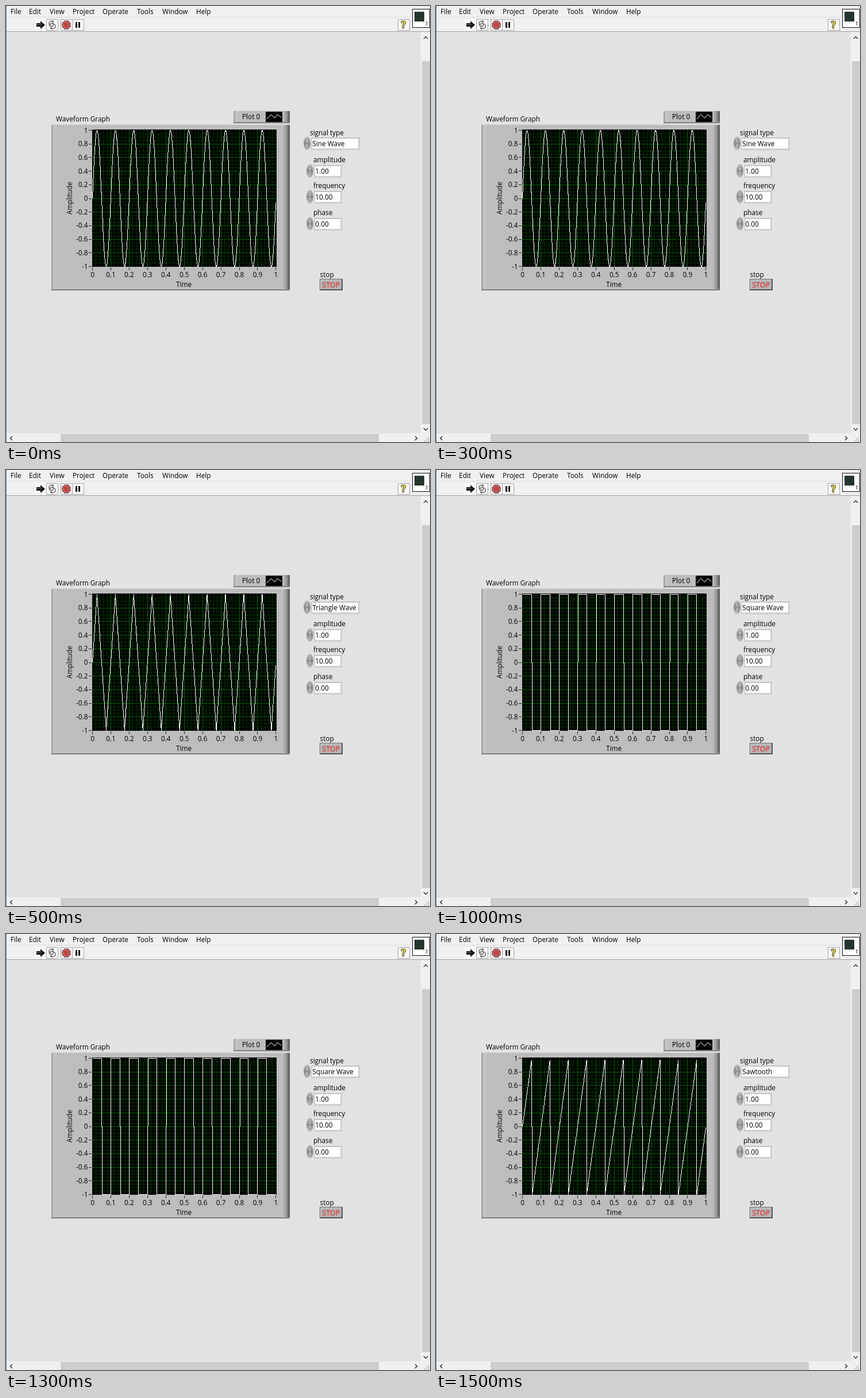
These frames come from a looping animation (738 by 759 pixels, 2 s). An HTML page:

```html
<!DOCTYPE html>
<html lang="en">
<head>
<meta charset="utf-8">
<title>Waveform generator panel</title>
<style>
  html, body { margin: 0; width: 100%; height: 100%; overflow: hidden; background: #e2e2e2; }
  svg { display: block; width: 738px; height: 759px; }
  text { font: 11.8px "Open Sans", "Noto Sans", sans-serif; fill: #000; }
  .crisp { shape-rendering: crispEdges; }
</style>
</head>
<body>
<svg id="stage" viewBox="0 0 738 759">
  <defs>
    <linearGradient id="rim">
      <stop offset="0" stop-color="#9a9a9a"/><stop offset=".4" stop-color="#c6c6c6"/><stop offset="1" stop-color="#bdbdbd"/>
    </linearGradient>
    <linearGradient id="shade">
      <stop offset="0" stop-color="#bdbdbd"/><stop offset=".5" stop-color="#999"/><stop offset="1" stop-color="#505050"/>
    </linearGradient>
    <linearGradient id="knob">
      <stop offset="0" stop-color="#858585"/><stop offset=".4" stop-color="#c4c4c4"/><stop offset="1" stop-color="#8c8c8c"/>
    </linearGradient>
    <clipPath id="plot"><rect x="150" y="215" width="321" height="239"/></clipPath>
  </defs>
</svg>
<script>
const stage = document.getElementById('stage');

function add(tag, attrs, content = '') {
  const node = document.createElementNS('http://www.w3.org/2000/svg', tag);
  for (const key in attrs) node.setAttribute(key, attrs[key]);
  node.textContent = content;
  return stage.appendChild(node);
}
const rect = (x, y, width, height, fill, more = {}) =>
  add('rect', { x, y, width, height, fill, class: 'crisp', ...more });
const box = (x, y, w, h, fill, stroke) =>
  rect(x + .5, y + .5, w - 1, h - 1, fill, { stroke });
const path = (d, stroke, more = {}) => add('path', { d, stroke, fill: 'none', ...more });
const fillPath = (d, fill, more = {}) => add('path', { d, fill, ...more });
const label = (str, x, y, more = {}) => add('text', { x, y, ...more }, str);

// Window chrome
rect(0, 0, 738, 44, '#f0f0f0');
rect(0, 19, 706, 1, '#dcdcdc');
rect(0, 44, 738, 1, '#a0a0a0');
const menu = { File: 8, Edit: 40, View: 76, Project: 116, Operate: 168, Tools: 228, Window: 272, Help: 331 };
for (const name in menu) label(name, menu[name], 13.5);

// Toolbar
rect(50, 23, 86, 20, '#f7f7f7');
for (const x of [70, 95, 115]) box(x, 23, 21, 20, '#f7f7f7', '#a6a6a6');
fillPath('M53 30H60V26L68 33L60 40V36H53Z', '#111');
path('M54 32.5H62', '#777');
path('M75 33V29Q75 27 78 27H82M80 25L83 27.5L80 30M86 32V36Q86 39 83 39H78M80 36L77 38.5L80 41M77 31H84L82 35H76Z', '#222');
const octagon = 'M102 26H108L112 30V36L108 40H102L98 36V30Z';
fillPath(octagon, '#c04848', { stroke: '#4a1c1c' });
path(octagon, '#e0a0a0', { transform: 'translate(21 6.6) scale(.8)' });
rect(121, 28, 3, 10, '#111');
rect(126, 28, 3, 10, '#111');
box(682, 23, 21, 20, '#f7f7f7', '#a6a6a6');
label('?', 687.5, 39, { style: 'font-size:17px;font-weight:800;fill:#f3e624;stroke:#333;stroke-width:.8px' });
box(707, 5, 31, 33, '#fff', '#111');
rect(711, 10, 17, 17, '#25352c');
label('1', 730, 34, { style: 'font-size:8.5px' });

// Scroll bars
rect(722, 45, 16, 699, '#f0f0f0');
rect(0, 744, 738, 15, '#f0f0f0');
rect(724, 96, 14, 632, '#cdcdcd');
rect(95, 745, 554, 14, '#cdcdcd');
path('M727 57L730.5 53.5L734 57M727 735L730.5 738.5L734 735M11 749L7.5 752.5L11 756M712 749L715.5 752.5L712 756',
  '#454545', { 'stroke-width': 1.7 });
for (let row = 0; row < 3; row++)
  for (let col = 0; col <= row; col++) rect(734 - 3 * col, 750 + 3 * row, 2, 2, '#bcbcbc');
rect(0, 0, 1, 759, '#3b9bdc');

// Raised panels
function panel(x, y, w, h) {
  rect(x, y, w, h, '#bdbdbd');
  rect(x, y, 11, h, 'url(#rim)');
  rect(x + w - 12, y, 12, h, 'url(#shade)');
  rect(x, y, w, 1, '#d4d4d4');
  rect(x, y + h - 2, w, 1, '#999');
  rect(x, y + h - 1, w, 1, '#606060');
}
label('Waveform Graph', 87, 201);
panel(396, 182, 98, 22);
label('Plot 0', 411, 197);
rect(452, 184, 29, 18, '#000');
path('M454 197L461 189L468 195L473 189L479 194', '#fff');
panel(79, 206, 415, 289);

// Plot area, grid and scales
const left = 150, top1 = 216, width = 319.4, height = 237;
rect(left, 215, 321, 239, '#000');
function grid(cols, rows, color) {
  let d = '';
  for (let i = 1; i < cols; i++) d += `M${Math.round(left + i * width / cols) + .5} 215V454`;
  for (let i = 1; i < rows; i++) d += `M150 ${Math.round(top1 + i * height / rows) + .5}H471`;
  path(d, color, { class: 'crisp' });
}
grid(50, 40, '#003000');
grid(10, 10, '#006400');

for (let i = 0; i <= 10; i++) {
  const x = left + i * width / 10, y = top1 + i * height / 10;
  rect(Math.round(x), 455, 1, 5, '#222');
  rect(144, Math.round(y), 5, 1, '#222');
  label(i / 10, x + .5, 472, { 'text-anchor': 'middle' });
  label((5 - i) / 5, 142.5, y + 4.5, { 'text-anchor': 'end' });
}
label('Time', 309.5, 489, { 'text-anchor': 'middle' });
label('Amplitude', 0, 0, { 'text-anchor': 'middle', transform: 'translate(115 334.5) rotate(-90)' });

// Controls
function control(name, labelX, labelY, x, y, w, value) {
  label(name, labelX, labelY);
  const cx = x - 7, cy = y + 10;
  add('ellipse', { cx, cy, rx: 5.5, ry: 11, fill: 'url(#knob)', stroke: '#858585', 'stroke-width': .6 });
  fillPath(`M${cx - 3} ${cy - 2}h6l-3 -5ZM${cx - 3} ${cy + 2}h6l-3 5Z`, '#ddd', { stroke: '#555', 'stroke-width': .7 });
  path(`M${cx - 5} ${cy}h10`, '#777');
  rect(x, y, w, 22, '#cfcfcf');
  rect(x, y, w, 1, '#bcbcbc');
  rect(x + 2, y + 2, w - 5, 17, '#fff');
  return label(value, x + 2.3, y + 15);
}
const signalName = control('signal type', 529, 225, 531, 229, 85, '');
control('amplitude', 535, 272, 536, 277, 49, '1.00');
control('frequency', 535, 317, 536, 322, 49, '10.00');
control('phase', 535, 364, 536, 369, 49, '0.00');
label('stop', 546.5, 472);
rect(546, 475, 40, 20, '#555');
rect(547, 476, 37, 17, '#d8d8d8');
rect(548, 477, 36, 16, '#b4b4b4');
label('STOP', 550.5, 490, { style: 'font-size:12.3px;fill:#f01414' });

// Signals: ten cycles over one second
const px = t => left + .5 + t * width;
const py = v => top1 + .5 + (1 - v) * height / 2;
const middle = py(0);

function sampled(wave) {
  let d = '';
  for (let i = 0; i < 1000; i++)
    d += `${i ? 'L' : 'M'}${px(i / 1000).toFixed(2)} ${py(wave(i / 100 % 1)).toFixed(2)}`;
  return d;
}
// Some vertical edges straddle two pixel columns and step at mid height.
function edge(k, to) {
  const x = px(k / 20), step = [1, 3].includes(k % 5) ? 1 : 0;
  return `H${x}V${middle}H${x + step}V${py(to)}`;
}
function square() {
  let d = `M${px(0)} ${py(1)}`;
  for (let k = 1; k < 20; k++) d += edge(k, k % 2 ? -1 : 1);
  return d + `H${px(1)}`;
}
function sawtooth() {
  let d = `M${px(0)} ${middle}`;
  for (let k = 1; k < 20; k += 2) d += `L${px(k / 20)} ${py(.98)}` + edge(k, -1);
  return d + `L${px(.999)} ${py(-.02)}`;
}
const signals = [
  ['Sine Wave', sampled(p => Math.sin(2 * Math.PI * p))],
  ['Triangle Wave', sampled(p => p < .25 ? 4 * p : p < .75 ? 2 - 4 * p : 4 * p - 4)],
  ['Square Wave', square()],
  ['Sawtooth', sawtooth()]
];
const trace = path('', '#fff', { class: 'crisp', 'stroke-linejoin': 'bevel', 'clip-path': 'url(#plot)' });

let shown = -1;
function draw(now) {
  const index = Math.floor(now % 2000 / 500);
  if (index !== shown) {
    shown = index;
    signalName.textContent = signals[index][0];
    trace.setAttribute('d', signals[index][1]);
  }
  requestAnimationFrame(draw);
}
draw(performance.now());
</script>
</body>
</html>
```
